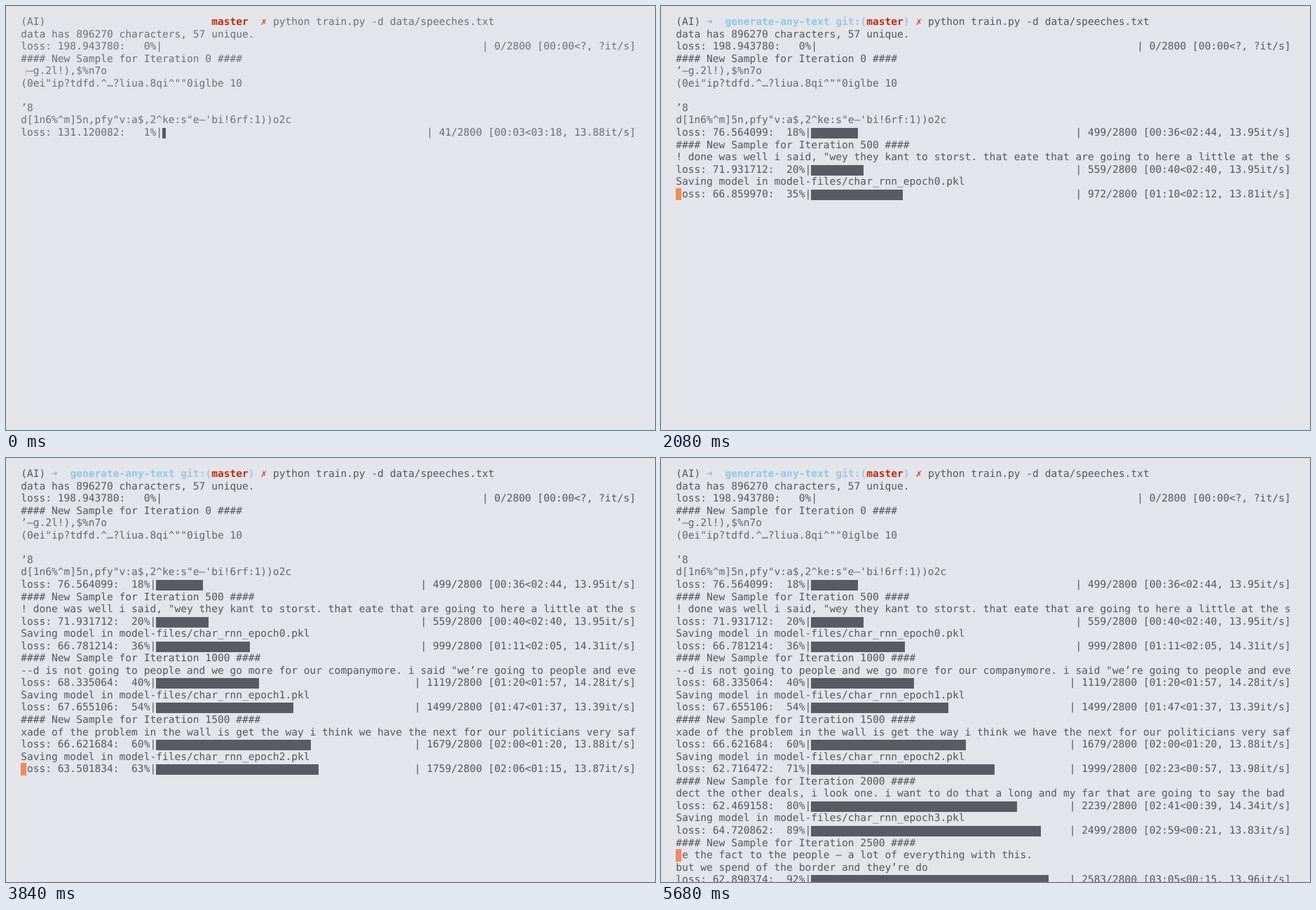
Animation, 926 px wide and 605 px high, one loop 5760 ms. Source, as an HTML page:

```html
<!DOCTYPE html>
<html lang="en">
<head>
<meta charset="utf-8">
<title>Training log</title>
<style>
  html, body { margin: 0; width: 100%; height: 100%; overflow: hidden; background: #e4e5ea; }
  #term {
    position: absolute; left: 0; top: 0; width: 926px; height: 605px; overflow: hidden;
    font: 14.57px/17.55px "DejaVu Sans Mono", monospace;
    text-rendering: geometricPrecision; font-variant-ligatures: none; white-space: pre;
  }
  .row { position: absolute; left: 21.2px; height: 17.55px; }
  .bar { position: absolute; top: 2px; height: 15px; background: #5a5a62; }
  #cursor { position: absolute; background: #ee8a5b; }
  b { color: #c02a12; }
  .dim { opacity: var(--dim); }
  .arrow { color: #8fa5a8; }
  .dir { color: #70bfe8; font-weight: bold; }
  .git { color: #86bce6; font-weight: bold; }
  .cross { color: #cf452c; }
</style>
</head>
<body>
<div id="term"></div>
<script>
const LOOP = 5760, STEP = 80, TOTAL = 2800, COLS = 100;
const CELL = 8.773, LINE = 17.55, TOP = 14;
const START = 41, PER_MS = 0.4475, SPEED = 13.9;

const PROMPT = '(AI) <span class="dim"><span class="arrow">➜</span>  <span class="dir">generate-any-text</span> ' +
  '<span class="git">git:(</span></span><b>master</b><span class="dim git">)</span> ' +
  '<span class="cross">✗</span> python train.py -d data/speeches.txt';

const NOISE = ['’—g.2l!),$%n7o', '(0ei"ip?tdfd.^…?liua.8qi^""0iglbe 10', '', '’8',
  'd[1n6%^m]5n,pfy"v:a$,2^ke:s"e—\'bi!6rf:1))o2c'];

// loss and rate are those of the progress line that the event closes
const sample = (at, loss, rate, ...text) =>
  ({ at, loss, rate, text: [`#### New Sample for Iteration ${at} ####`, ...text] });
const save = (epoch, loss, rate) =>
  ({ at: 560 * (epoch + 1), loss, rate, text: [`Saving model in model-files/char_rnn_epoch${epoch}.pkl`] });

const EVENTS = [
  sample(0, 198.94378, 0, ...NOISE),
  sample(500, 76.564099, 13.95,
    '! done was well i said, "wey they kant to storst. that eate that are going to here a little at the s'),
  save(0, 71.931712, 13.95),
  sample(1000, 66.781214, 14.31,
    '--d is not going to people and we go more for our companymore. i said "we’re going to people and eve'),
  save(1, 68.335064, 14.28),
  sample(1500, 67.655106, 13.39,
    'xade of the problem in the wall is get the way i think we have the next for our politicians very saf'),
  save(2, 66.621684, 13.88),
  sample(2000, 62.716472, 13.98,
    'dect the other deals, i look one. i want to do that a long and my far that are going to say the bad '),
  save(3, 62.469158, 14.34),
  sample(2500, 64.720862, 13.83,
    'be the fact to the people — a lot of everything with this.', 'but we spend of the border and they’re do')
];

const term = document.getElementById('term');

function addDiv(name) {
  const div = document.createElement('div');
  div.className = name;
  return term.appendChild(div);
}

const rows = Array.from({ length: 35 }, (_, i) => {
  const row = addDiv('row');
  row.style.top = TOP + i * LINE + 'px';
  return row;
});
const cursor = addDiv('');
cursor.id = 'cursor';

// keep glyph advance equal to the terminal cell
rows[1].textContent = '0'.repeat(COLS);
term.style.letterSpacing = CELL - rows[1].getBoundingClientRect().width / COLS + 'px';

const mix = (a, b, p) => a + (b - a) * p;
const two = v => String(Math.floor(v)).padStart(2, '0');
const clock = s => two(s / 60) + ':' + two(s % 60);

const liveLoss = n => 64 + 76 * Math.exp(-n / 300) + 1.5 * Math.sin(n * 1.7);
const liveRate = n => SPEED + 0.1 * Math.sin(n);

function progress(n, loss = liveLoss(n), rate = liveRate(n)) {
  const times = n
    ? `${clock(n / SPEED + 0.12)}<${clock((TOTAL - n) / rate)}, ${rate.toFixed(2)}`
    : '00:00<?, ?';
  const percent = String(Math.round(n / TOTAL * 100)).padStart(3);
  const left = `loss: ${loss.toFixed(6)}: ${percent}%|`;
  const right = `| ${n}/${TOTAL} [${times}it/s]`;
  const space = COLS - left.length - right.length;
  return {
    text: left + ' '.repeat(space) + right,
    x: left.length * CELL,
    width: Math.floor(space * 8 * n / TOTAL) / 8 * CELL
  };
}

function screen(n) {
  const lines = ['data has 896270 characters, 57 unique.'];
  let cursorRow = 0;
  for (const { at, loss, rate, text } of EVENTS.filter(e => e.at <= n)) {
    lines.push(progress(Math.max(0, at - 1), loss, rate));
    cursorRow = lines.length + 2;
    lines.push(...text);
  }
  lines.push(progress(n));
  return { lines, cursorRow };
}

function placeCursor(row, early) {
  const [x, y, w, h] = early ? [28, 6, 1.2, 10] : [20.8, 0, 8.6, LINE];
  cursor.style.cssText =
    `left:${x}px;top:${TOP + row * LINE + y}px;width:${w}px;height:${h}px;opacity:${early ? 0.7 : 1}`;
}

function draw(step) {
  const ms = step * STEP, n = Math.round(START + ms * PER_MS);
  const { lines, cursorRow } = screen(n);
  const early = n < 500;
  const settle = Math.min(1, ms / 1520);

  term.style.setProperty('--dim', step ? mix(0.3, 0.75, settle) : 0);
  rows.forEach((row, i) => {
    const ink = i > 8 ? (step ? 1 : 0.85) : mix(0.82, i > 3 ? 0.9 : 1, settle);
    row.style.color = `rgba(85, 86, 93, ${ink})`;
    if (!i) return;
    const line = lines[i - 1] ?? '';
    row.textContent = line.text ?? line;
    if (line.width) {
      const bar = document.createElement('span');
      bar.className = 'bar';
      bar.style.left = line.x + 'px';
      bar.style.width = line.width + 'px';
      row.appendChild(bar);
    }
  });
  if (early) rows[cursorRow].textContent = ' ' + NOISE[0].slice(1);
  placeCursor(cursorRow, early);
}

rows[0].innerHTML = PROMPT;
let shown = -1;
function tick() {
  const step = Math.floor(performance.now() % LOOP / STEP);
  if (step !== shown) draw(shown = step);
  requestAnimationFrame(tick);
}
tick();
</script>
</body>
</html>
```
